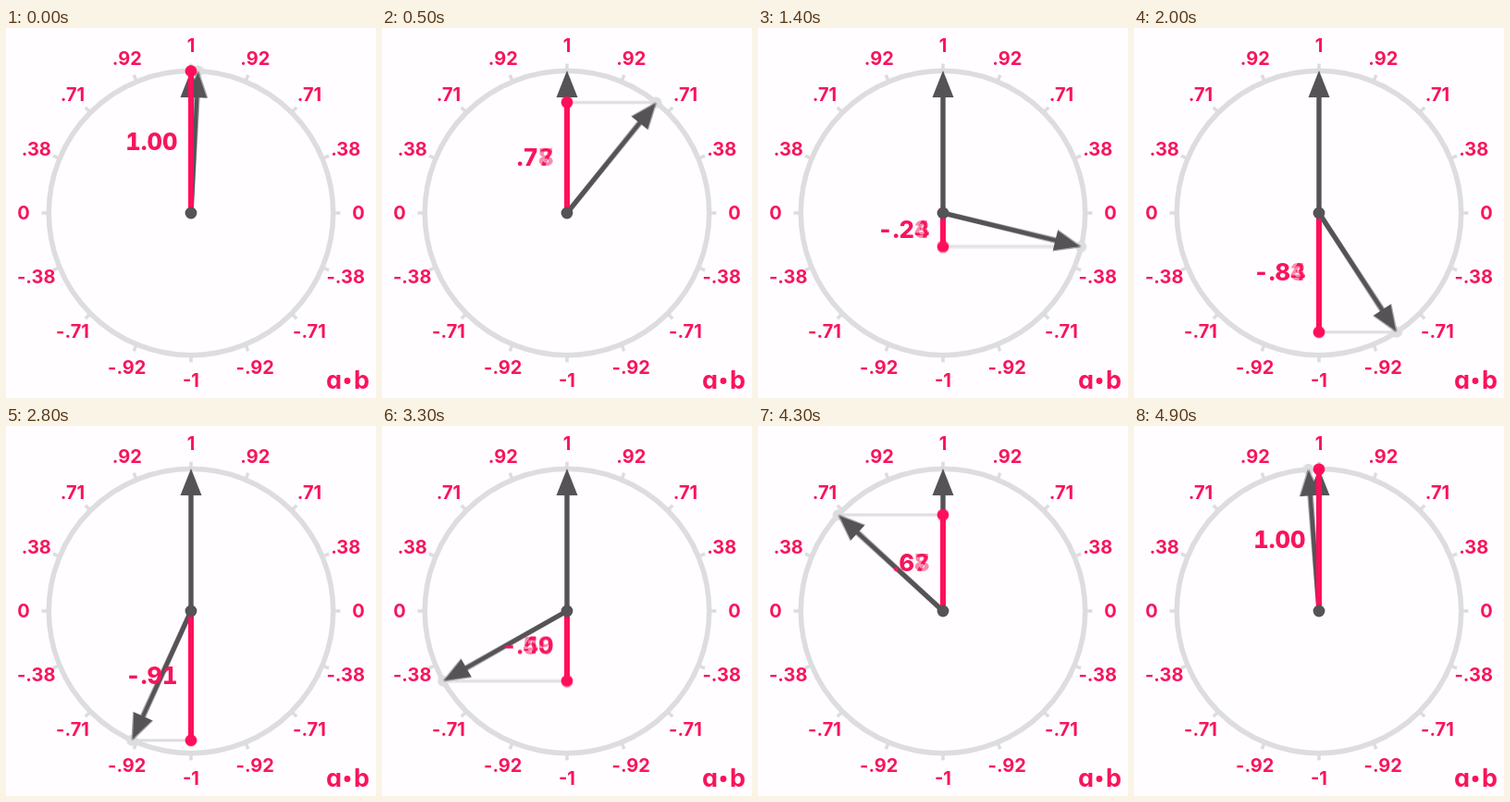
These frames come from a looping animation (400x400 px, 5000 ms). An HTML page:

```html
<!DOCTYPE html>
<html lang="en">
<head>
<meta charset="utf-8">
<title>Dot product</title>
<style>
html, body { margin: 0; height: 100%; overflow: hidden; background: #fffdff; }
svg { display: block; width: 100%; height: 100%; }
text { font: 700 20px Inter, sans-serif; fill: #f8145c; text-anchor: middle; }
text.value { font-size: 25.5px; font-weight: 800; text-anchor: end; font-feature-settings: "tnum"; }
text.name { font-size: 27px; font-feature-settings: "cv11"; }
</style>
</head>
<body>
<svg viewBox="0 0 400 400">
  <g id="dial"></g>
  <g id="scene"></g>
</svg>
<script>
const RED = "#ff0f5b", DARK = "#555355", PALE = "#dddcdf";
const R = 153.7, PERIOD = 5000, STEP = 100;
const byId = id => document.getElementById(id);
const rad = deg => deg * Math.PI / 180;
const at = (deg, r) => [200 + r * Math.sin(rad(deg)), 200 - r * Math.cos(rad(deg))];
const number = (v, digits) => v.toFixed(digits).replace(/^(-?)0\./, "$1.");

const line = ([x1, y1], [x2, y2], color, width) =>
  `<line x1="${x1}" y1="${y1}" x2="${x2}" y2="${y2}" stroke="${color}" stroke-width="${width}"/>`;
const dot = ([x, y], r, color) => `<circle cx="${x}" cy="${y}" r="${r}" fill="${color}"/>`;
const text = (x, y, s, kind = "") => `<text class="${kind}" x="${x}" y="${y}">${s}</text>`;
const arrow = deg =>
  `<path transform="rotate(${deg} 200 200)" fill="${DARK}" d="M200 46l11.5 29h-8.8V200h-5.4V75h-8.8z"/>`;

function dial() {
  let out = `<rect width="400" height="400" fill="#fffdff"/>
    <circle cx="200" cy="200" r="${R}" fill="none" stroke="${PALE}" stroke-width="5.5"/>`;
  for (let i = 0; i < 16; i++) {
    const deg = i * 22.5, [x, y] = at(deg, 181);
    const label = i % 4 ? number(Math.cos(rad(deg)), 2) : [1, 0, -1, 0][i / 4];
    out += line(at(deg, 155), at(deg, 161.5), PALE, 3.5) + text(x, y + 7.2, label);
  }
  return out + text(354.5, 390, "a", "name") + dot([369, 381.5], 3.4, RED) +
    text(384.5, 390, "b", "name");
}

function vectors(deg) {
  const tip = at(deg, R), foot = [200, tip[1]], center = [200, 200];
  return line(foot, tip, PALE, 3) + dot(tip, 6, PALE) +
    arrow(0) + arrow(deg) +
    line(center, foot, RED, 6) + dot(foot, 6.4, RED) + dot(center, 6.4, DARK) +
    text(185.5, (200 + tip[1]) / 2 + 8.8, number(Math.cos(rad(deg)), 2), "value");
}

// Averages two nearby poses for a short motion blur
function draw(now) {
  const t = Math.floor(now % PERIOD / STEP) * STEP;
  const deg = 2.9 + 360 * t / PERIOD;
  byId("scene").innerHTML = [-0.3, 0.3].map((shift, i) =>
    `<g opacity="${1 / (i + 1)}"><use href="#dial"/>${vectors(deg + shift)}</g>`).join("");
}

byId("dial").innerHTML = dial();
const start = performance.now();
function tick() {
  draw(performance.now() - start);
  requestAnimationFrame(tick);
}
tick();
</script>
</body>
</html>
```
